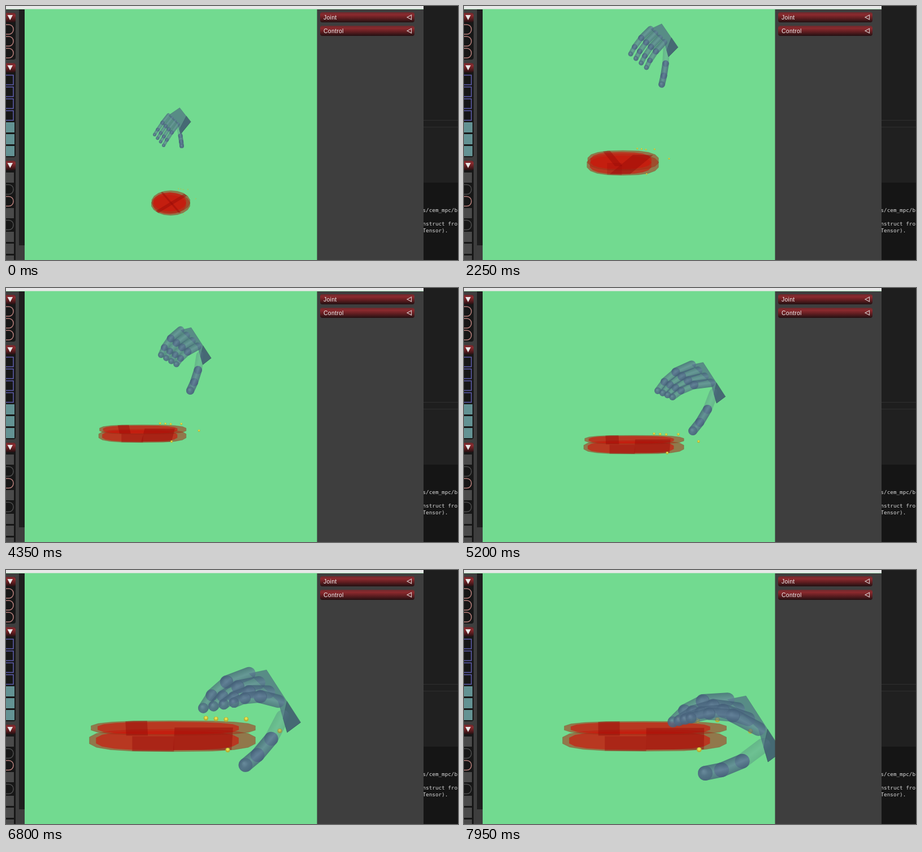
Animation of 800 by 450 pixels, one loop 8000 ms. Source, as an HTML page with a canvas:

```html
<!DOCTYPE html>
<html lang="en">
<head>
<meta charset="utf-8">
<title>Robot hand simulator</title>
<style>
html, body { margin: 0; width: 100%; height: 100%; overflow: hidden; background: #3e3e3e; }
canvas { display: block; }
</style>
</head>
<body>
<canvas id="stage" width="800" height="450"></canvas>
<script>
const g = document.getElementById('stage').getContext('2d');
const LOOP = 8000;

// Key poses: hand scale, wrist corner, outer finger tips, thumb tip, dish box.
// Everything else is derived from these.
const pose = (t, size, wrist, far, near, thumb, dish) =>
  ({ t, size: [size], wrist, far, near, thumb, dish });
const poses = [
  pose(0, 3.9, [309, 227], [263, 228], [279, 247], [311, 248], [257, 327, 326, 371]),
  pose(2250, 5.8, [362, 90], [295, 85], [323, 109], [350, 139], [217, 256, 345, 300]),
  pose(3450, 6.6, [283, 84], [215, 66], [253, 87], [268, 134], [111, 223, 274, 262]),
  pose(5200, 8, [447, 204], [343, 182], [369, 193], [405, 253], [211, 261, 390, 294]),
  pose(6150, 12, [529, 240], [363, 205], [411, 215], [451, 310], [161, 262, 453, 321]),
  pose(7400, 12.5, [470, 327], [337, 270], [397, 252], [400, 363], [140, 271, 434, 322]),
  pose(7950, 13, [538, 340], [370, 269], [402, 262], [427, 360], [173, 268, 466, 321])];

// Contact points as fractions of the dish box.
const contacts = [[.7, -.08], [.76, -.06], [.82, -.04], [.94, -.05], [1.14, .33], [.83, .95]];

const lerp = (a, b, s) => a + (b - a) * s;
const mix = (p, q, s) => [lerp(p[0], q[0], s), lerp(p[1], q[1], s)];
const shift = (p, x, y, k) => [p[0] + x * k, p[1] + y * k];

// Monotone cubic interpolation, so parts never overshoot a pose.
function slope(key, i, k) {
  const rate = j => (poses[j + 1][key][k] - poses[j][key][k]) / (poses[j + 1].t - poses[j].t);
  if (i === 0) return rate(0);
  if (i === poses.length - 1) return rate(i - 1);
  const a = rate(i - 1), b = rate(i);
  return a * b <= 0 ? 0 : 2 * a * b / (a + b);
}
function sample(key, t) {
  let i = 0;
  while (i < poses.length - 2 && t >= poses[i + 1].t) i++;
  const h = poses[i + 1].t - poses[i].t;
  const u = Math.min(1, (t - poses[i].t) / h), v = 1 - u;
  return poses[i][key].map((a, k) =>
    v * v * (1 + 2 * u) * a + u * u * (3 - 2 * u) * poses[i + 1][key][k] +
    h * u * v * (v * slope(key, i, k) - u * slope(key, i + 1, k)));
}

function rect(x, y, w, h, color) {
  g.fillStyle = color;
  g.fillRect(x, y, w, h);
}
function pathOf(points) {
  const path = new Path2D();
  for (const [x, y] of points) path.lineTo(x, y);
  path.closePath();
  return path;
}
function poly(points, fill, stroke) {
  const path = pathOf(points);
  g.fillStyle = fill;
  g.fill(path);
  if (stroke) {
    g.strokeStyle = stroke;
    g.lineWidth = .7;
    g.stroke(path);
  }
}

function disc([x0, y0, x1, y1], n) {
  const sides = 18, bend = v => Math.sign(v) * Math.abs(v) ** (2 / n);
  return Array.from({ length: sides }, (_, i) => {
    const a = (i + .5) / sides * 2 * Math.PI;
    return [lerp(x0, x1, .5 + bend(Math.cos(a)) / 2), lerp(y0, y1, .5 + bend(Math.sin(a)) / 2)];
  });
}

// tilt: 0 = seen from the side, 1 = seen from above
function drawDish([x0, y0, x1, y1], tilt, aspect) {
  const n = 2.9 - .9 * tilt, w = x1 - x0, h = y1 - y0;
  const flat = Math.exp(-9 * (aspect - .18));
  const lower = [x0, y0 + h * (.1 + .18 * flat), x1, y1];
  const upper = [x0 + w * .01, y0, x1, y0 + h * (.9 - .45 * flat)];
  const clip = new Path2D();
  for (const box of [lower, upper]) {
    const [l, t, r, b] = box, outline = disc(box, n);
    poly(outline, 'rgba(170,45,22,.56)', 'rgba(110,50,20,.35)');
    const inner = [lerp(l, r, .04), lerp(t, b, .08), lerp(l, r, .9), lerp(t, b, .94)];
    poly(disc(inner, n), 'rgba(208,18,9,.62)');
    clip.addPath(pathOf(outline));
  }
  g.save();
  g.clip(clip);
  const facet = (u0, u1, v0, v1, move, slant, alpha) => {
    const c = (u0 + u1) / 2 + move * tilt, half = (u1 - u0) / 2 * (1 - .55 * tilt);
    const corner = (u, v, lean) => [x0 + w * (u + lean * tilt), y0 + h * v];
    poly([corner(c - half, v0, slant), corner(c + half, v0, slant),
          corner(c + half, v1, -slant), corner(c - half, v1, -slant)], `rgba(150,10,8,${alpha})`);
  };
  facet(.22, .35, 0, lerp(.48, .9, tilt), .2, -.25, .45);
  facet(.51, .86, lerp(.22, .1, tilt), .95, -.18, .45, .45);
  facet(.26, .51, .5, 1, 0, 0, .4 * (1 - tilt));
  g.restore();
}

function drawContacts([x0, y0, x1, y1], r) {
  for (const [u, v] of contacts) {
    const x = lerp(x0, x1, u), y = lerp(y0, y1, v);
    for (const [k, color] of [[1, '#b5b234'], [.6, '#e8e04a']]) {
      g.fillStyle = color;
      g.beginPath();
      g.arc(x, y - r * (1 - k) * .6, r * k, 0, 7);
      g.fill();
    }
  }
}

function shade(c, light, mid, dark, alpha) {
  [light, mid, dark].forEach((rgb, i) => c.addColorStop(i / 2, `rgba(${rgb},${alpha})`));
  return c;
}
function ball([x, y], r) {
  const c = g.createRadialGradient(x - r * .25, y - r * .3, 0, x, y, r);
  g.fillStyle = shade(c, '112,140,164', '80,106,132', '70,96,122', .66);
  g.beginPath();
  g.arc(x, y, r, 0, 7);
  g.fill();
}
function bone([x0, y0], [x1, y1], r, alpha) {
  const len = Math.hypot(x1 - x0, y1 - y0) || 1;
  const nx = (y1 - y0) / len * r, ny = (x0 - x1) / len * r;
  const c = g.createLinearGradient(x0 - nx, y0 - ny, x0 + nx, y0 + ny);
  g.strokeStyle = shade(c, '64,92,116', '98,128,152', '68,94,120', alpha);
  g.lineWidth = 2 * r;
  g.lineCap = 'round';
  g.beginPath();
  g.moveTo(x0, y0);
  g.lineTo(x1, y1);
  g.stroke();
}
// Three bones on an arc from root to tip.
function digit(root, tip, bulge, r0, r1, alphas) {
  const dx = tip[0] - root[0], dy = tip[1] - root[1];
  const joints = [0, .4, .75, 1].map(s =>
    shift(mix(root, tip, s), -dy, dx, bulge * 4 * s * (1 - s)));
  alphas.forEach((alpha, i) => {
    const r = lerp(r0, r1, i / 2);
    bone(joints[i], joints[i + 1], r, alpha);
    ball(joints[i + 1], r);
  });
}

function drawHand(t, r, tilt) {
  const wrist = sample('wrist', t), far = sample('far', t), near = sample('near', t);
  const curl = .02 + .12 * t / LOOP;
  const farRoot = shift(wrist, -5.5, -8.5, r);
  const nearRoot = shift(wrist, -1.3, -4.5, r);
  const back = shift(farRoot, 2.5 + 2.6 * tilt, -.5 - 3 * tilt, r);
  const heel = shift(wrist, 1.9 + 2.7 * tilt, -1.4 - 4.2 * tilt, r);
  poly([farRoot, back, heel, wrist, nearRoot], 'rgba(75,100,130,.66)', 'rgba(50,75,95,.35)');
  for (let f = 0; f < 4; f++)
    digit(mix(farRoot, nearRoot, f / 3), mix(far, near, f / 3), curl, r * .95, r * .75, [.72, .62, .62]);
  poly([heel, wrist, mix(wrist, nearRoot, .45), mix(heel, back, .4)],
    'rgba(62,90,108,.7)', 'rgba(45,70,85,.5)');
  digit(mix(wrist, nearRoot, .5), sample('thumb', t), -curl * .6, r, r, [.28, .78, .78]);
}

function header(x, y, w, h) {
  const c = g.createLinearGradient(0, y, 0, y + h);
  c.addColorStop(0, '#6c2a2d');
  c.addColorStop(.25, '#8b2a2e');
  c.addColorStop(.6, '#5f1d20');
  c.addColorStop(1, '#221012');
  g.fillStyle = c;
  g.beginPath();
  g.roundRect(x, y, w, h, 4);
  g.fill();
}
function outline(y, color, radius) {
  g.strokeStyle = color;
  g.lineWidth = 1.5;
  g.beginPath();
  g.roundRect(-20, y, 33, 17, radius);
  g.stroke();
}
function group(y, bottom) {
  g.fillStyle = '#171717';
  g.beginPath();
  g.roundRect(-10, y, 27, bottom - y, 4);
  g.fill();
  header(-10, y, 27, 17);
  poly([[2.5, y + 4], [12, y + 4], [7.3, y + 13]], '#e8e8e8');
}

function drawLeft() {
  const salmon = '#b8807c', dim = '#4d4d4d', row = 21;
  rect(0, 6, 33, 444, '#3e3e3e');
  rect(23, 6, 10, 418, '#1e1e1e');
  group(12, 95);
  group(101, 268);
  group(274, 460);
  for (let i = 0; i < 3; i++) {
    outline(33 + row * i, salmon, 8);
    rect(0, 206 + row * i, 15, 18, '#639293');
  }
  for (let i = 0; i < 4; i++) outline(122.5 + row * i, '#5f5fae', 0);
  ['bar', dim, salmon, 'bar', dim, 'bar', 'bar', 'bar'].forEach((kind, i) => {
    if (kind === 'bar') rect(0, 295 + row * i, 14, 18, '#4a4a4a');
    else outline(295.5 + row * i, kind, 8);
  });
}

function drawRight() {
  rect(550.5, 6, 188.5, 444, '#3e3e3e');
  g.font = '10.4px "Liberation Sans", Arial, sans-serif';
  g.letterSpacing = '0.3px';
  ['Joint', 'Control'].forEach((label, i) => {
    const y = 11 + 24 * i;
    header(556, y, 167, 18);
    g.fillStyle = '#f2f2f2';
    g.fillText(label, 562, y + 13);
    g.strokeStyle = '#d2c4c4';
    g.lineWidth = 1.2;
    g.stroke(pathOf([[710, y + 9], [717.5, y + 5], [717.5, y + 13]]));
  });
}

function drawTerminal() {
  rect(739, 0, 61, 450, '#1e1e1e');
  rect(739, 202, 61, 1, '#303030');
  rect(739, 214, 61, 1, '#303030');
  rect(739, 215, 61, 98, '#202020');
  rect(739, 313, 61, 137, '#151515');
  g.save();
  g.beginPath();
  g.rect(739, 313, 61, 137);
  g.clip();
  g.fillStyle = '#dcdcdc';
  g.font = '9.3px "DejaVu Sans Mono", monospace';
  g.letterSpacing = '0px';
  ['s/cem_mpc/b', '', 'nstruct fro', 'Tensor).'].forEach((line, i) =>
    g.fillText(line, 737.5, 365 + 12 * i));
  g.restore();
}

function frame(now) {
  const t = now % LOOP;
  const [r] = sample('size', t), dish = sample('dish', t);
  const aspect = (dish[3] - dish[1]) / (dish[2] - dish[0]);
  const tilt = Math.max(0, Math.min(1, (aspect - .18) / .46));
  rect(0, 0, 800, 450, '#72da90');
  g.save();
  g.beginPath();
  g.rect(33, 6, 518, 444);
  g.clip();
  drawDish(dish, tilt, aspect);
  drawContacts(dish, .4 * r - .8);
  drawHand(t, r, tilt);
  g.restore();
  drawLeft();
  drawRight();
  drawTerminal();
  rect(0, 0, 739, 5.5, '#e8e8e8');
  requestAnimationFrame(frame);
}
requestAnimationFrame(frame);
</script>
</body>
</html>
```
